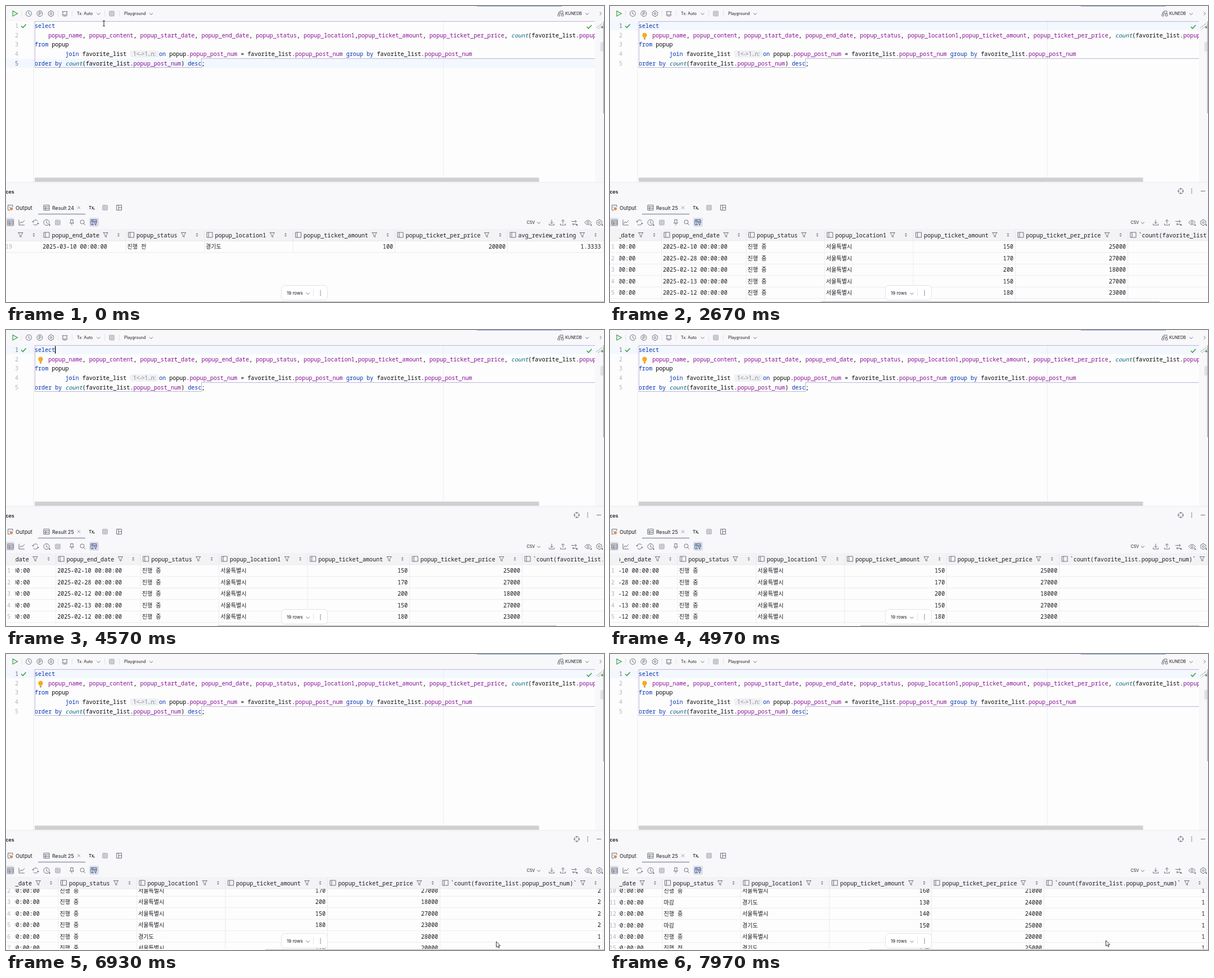
An HTML page with a canvas that plays this animation: 1063 px wide and 527 px high, repeating every 8000 ms.

```html
<!DOCTYPE html>
<html lang="ko">
<head>
<meta charset="utf-8">
<title>Query console</title>
<style>
html, body { margin: 0; width: 100%; height: 100%; overflow: hidden; background: #fdfdfd; }
canvas { display: block; }
</style>
</head>
<body>
<canvas id="stage" width="1063" height="527"></canvas>
<script>
const g = document.getElementById('stage').getContext('2d');
const LOOP = 8000, CLICK = 300, RUN = 1150, LOADED = 1250, DONE = 1650, BULB = 2000, HOVER = 1900;
const CW = 6.05, LINE_H = 16.7, ROW_H = 20.45;
const MONO = '"Noto Sans Mono", "Noto Sans CJK KR", monospace';
const UI = 'Inter, sans-serif';
const INK = '#1b1c20', ICON = '#6c707e', PALE = '#b4b7c0', RULE = '#ebecf0', PANEL = '#f8f8fb', GREEN = '#3d9f4d', RED = '#db3b4b';

const KEYWORDS = new Set(['select', 'from', 'join', 'on', 'group', 'by', 'order', 'desc']);
const CODE = [
  'select',
  '    popup_name, popup_content, popup_start_date, popup_end_date, popup_status, popup_location1,popup_ticket_amount, popup_ticket_per_price, count(favorite_list.popup_post_num)',
  'from popup',
  '         join favorite_list',
  'order by count(favorite_list.popup_post_num) desc;'
];
const JOIN_TAIL = 'on popup.popup_post_num = favorite_list.popup_post_num group by favorite_list.popup_post_num';

const NAMES = ['start_date', 'end_date', 'status', 'location1', 'ticket_amount', 'ticket_per_price'].map(n => 'popup_' + n);
const WIDTHS = [163.5, 150.5, 139.5, 157.5, 181.5, 200];
// day, status, city, amount, price in thousands
const ROWS = `02-10 중 S 150 25|02-28 중 S 170 27|02-12 중 S 200 18|02-13 중 S 150 27|02-12 중 S 180 23
|02-20 중 G 110 28|02-18 중 S 120 20|02-05 - G 160 21|02-22 중 S 90 27|02-25 중 S 160 21|02-03 - G 130 24
|02-21 중 S 140 24|02-04 - G 150 25|02-26 중 S 120 20|03-05 전 G 130 25|03-08 전 S 140 22|02-24 중 S 100 23
|03-06 전 G 120 21|03-10 전 G 100 20`.split('|').map((line, i) => {
  const [day, state, city, amount, price] = line.trim().split(' ');
  return ['2025-01-20 00:00:00', `2025-${day} 00:00:00`, state === '-' ? '마감' : '진행 ' + state,
    city === 'S' ? '서울특별시' : '경기도', amount, price + '000', i === 0 ? '3' : i < 5 ? '2' : '1'];
});

const SHAPES = {
  run: 'M-4-4.6L4.5 0-4 4.6z',
  clock: 'M5 0A5 5 0 1 1-5 0A5 5 0 1 1 5 0M0-3V0.5L2.5 2',
  param: 'M5 0A5 5 0 1 1-5 0A5 5 0 1 1 5 0M-1.3 3V-2.6H.5A1.6 1.6 0 0 1 .5 .8H-1.3',
  gear: 'M-1.3-5H1.3L2-3.6 3.7-3.4 5-1.2 4.2 0 5 1.2 3.7 3.4 2 3.6 1.3 5H-1.3L-2 3.6-3.7 3.4-5 1.2-4.2 0-5-1.2-3.7-3.4-2-3.6zM1.7 0A1.7 1.7 0 1 1-1.7 0A1.7 1.7 0 1 1 1.7 0',
  session: 'M-3.5-3.5H3.5V2.5H-3.5zM-5-3.5H-3.5M3.5-3.5H5M-5 2.5H-3.5M3.5 2.5H5M-3 4.5H3',
  down: 'M-3-1.4L0 1.5 3-1.4',
  right: 'M-1.5-3L1.5 0-1.5 3',
  scheme: 'M-1-4.5H4V-.5H-1zM-5 .8H-1.5V4.3H-5zM1.5 .8H5V4.3H1.5zM-1-2.5H-3.5V.8',
  check: 'M-4 0L-1 3 4.5-3',
  target: 'M4.5 0A4.5 4.5 0 1 1-4.5 0A4.5 4.5 0 1 1 4.5 0M0-5.5V-2M0 5.5V2M-5.5 0H-2M5.5 0H2',
  minus: 'M-4 0H4',
  console: 'M4-1V-4.5H-4.5V4.5H-1M-2.5-2L-.5 0',
  grid: 'M-5-4.5H5V4.5H-5zM-5-1.5H5M-5 1.5H5M-1.5-1.5V4.5',
  close: 'M-2.5-2.5L2.5 2.5M2.5-2.5L-2.5 2.5',
  layout: 'M-4.5-4.5H4.5V4.5H-4.5zM-1-4.5V4.5M-1 0H4.5',
  chart: 'M-5-5V4.5H5M-3.5 2L-1-1.5 1 .5 5-4',
  refresh: 'M-4.7-1A4.8 4.8 0 0 1 4-2.5M4.7 1A4.8 4.8 0 0 1-4 2.5M-6-2.5L-4.7-.5-2.7-1.7M6 2.5L4.7 .5 2.7 1.7',
  pin: 'M-2.5-5H2.5M-2-5V-1L-3.5 1H3.5L2-1V-5M0 1V5',
  search: 'M2.5-1A3.5 3.5 0 1 1-4.5-1A3.5 3.5 0 1 1 2.5-1M1.5 1.7L4.5 4.7',
  filterGrid: 'M0 4.5H-5V-4.5H5V-1M-5-1.8H5M-1.8-4.5V4.5M0 0H6L3.8 2.5V5L2.4 4.3V2.5z',
  download: 'M0-5V2M-2.8-.8L0 2 2.8-.8M-4.5 2V4.5H4.5V2',
  upload: 'M0 2V-5M-2.8-2.2L0-5 2.8-2.2M-4.5 2V4.5H4.5V2',
  compare: 'M-5-2H4M1.5-4.5L4-2 1.5 .5M5 3H-3M-.7 .8L-3 3-.7 5.2',
  eye: 'M-6 0Q0-8 6 0Q0 8-6 0zM1.8 0A1.8 1.8 0 1 1-1.8 0A1.8 1.8 0 1 1 1.8 0',
  column: 'M-5-4.5H5V4.5H-5zM-2-4.5V4.5',
  funnel: 'M-4.2-4H4.2L1.2 0V4L-1.2 2.8V0z',
  beam: 'M-2-5Q0-5 0-3.5Q0-5 2-5M0-3.5V3.5M-2 5Q0 5 0 3.5Q0 5 2 5'
};
const PATHS = Object.fromEntries(Object.entries(SHAPES).map(([k, d]) => [k, new Path2D(d)]));
const SORT = new Path2D('M-2-1L0-3.2 2-1zM-2 1L0 3.2 2 1z');
const ARROW = new Path2D('M0 0V10L2.4 8 4 11.4 5.6 10.6 4 7.3H7z');

function icon(name, x, y, color = ICON, width = 1) {
  g.save();
  g.translate(x, y);
  g.strokeStyle = color;
  g.lineWidth = width;
  g.stroke(PATHS[name]);
  g.restore();
}

function rect(x, y, w, h, color) {
  g.fillStyle = color;
  g.fillRect(x, y, w, h);
}

function pill(x, y, w, h, r, fill, border) {
  g.beginPath();
  g.roundRect(x, y, w, h, r);
  g.fillStyle = fill;
  g.fill();
  if (border) { g.strokeStyle = border; g.lineWidth = 1; g.stroke(); }
}

function dot(x, y, r, color) {
  g.beginPath();
  g.arc(x, y, r, 0, 7);
  g.fillStyle = color;
  g.fill();
}

function text(s, x, y, font, color = INK, align = 'left') {
  g.font = font;
  g.fillStyle = color;
  g.textAlign = align;
  g.fillText(s, x, y);
}

const mono = (s, x, y, color, align) => text(s, x, y, '10.08px ' + MONO, color, align);
const ui = (s, x, y, size, color, weight = 400) => text(s, x, y, `${weight} ${size}px ${UI}`, color);
const more = (x, y) => [-3.5, 0, 3.5].forEach(d => dot(x, y + d, 0.9, ICON));

function clip(x, y, w, h, draw) {
  g.save();
  g.beginPath();
  g.rect(x, y, w, h);
  g.clip();
  draw();
  g.restore();
}

function stop(x, y, running) {
  pill(x - 4.5, y - 4.5, 9, 9, 1.5, running ? '#fff5f5' : '#c9cbd1', running ? RED : '#b9bbc3');
}

function codeLine(s, x, y) {
  for (const { 0: word, index } of s.matchAll(/\w+|[^\w\s]+/g)) {
    const call = word === 'count';
    const color = call ? '#00627a' : KEYWORDS.has(word) ? '#0033b3' : word.startsWith('popup_') ? '#871094' : '#080808';
    text(word, x + index * CW, y, (call ? 'italic ' : '') + '10.08px ' + MONO, color);
  }
}

function toolbar(running) {
  rect(0, 0, 1063, 27, PANEL);
  rect(837, 0, 151, 0.7, '#5f7fc4');
  icon('run', 16, 13.5, GREEN, 1.2);
  icon('clock', 40.5, 13.5);
  icon('param', 60, 13.5);
  icon('gear', 80, 13.5);
  icon('session', 104.5, 13.5);
  [27, 92, 117, 175, 201].forEach(x => rect(x, 8, 1, 11, '#e3e4e9'));
  const tx = running ? PALE : INK;
  ui('Tx: Auto', 126, 16.3, 7.2, tx);
  icon('down', 164.5, 14, running ? PALE : ICON);
  stop(188, 13.5, running);
  ui('Playground', 210, 16.3, 7.2);
  icon('down', 258, 14);
  icon('scheme', 986, 13.5);
  ui('KUNEDB', 994, 16.3, 7.2);
  icon('down', 1033, 14);
  icon('right', 1057, 13.5);
}

function editor(t, running) {
  const current = t < CLICK ? 4 : 0;
  rect(0, 27, 1063, 287, '#fdfdfd');
  rect(0, 27 + current * LINE_H, 1047, LINE_H - 0.5, '#f3f7fe');
  rect(48.5, 27, 1, 287, RULE);
  rect(777, 27, 1, 278, RULE);
  CODE.forEach((s, i) => {
    const y = 39 + i * LINE_H;
    mono(i + 1, 22, y, i === current ? ICON : '#aeb3c2', 'right');
    clip(49, 27, 998, 278, () => codeLine(s, 51, y));
  });
  pill(220.5, 79, 51, 13, 4, '#f0f1f3');
  text('1<->1..n:', 226, 89, '10px "Noto Sans", sans-serif', '#868a91');
  codeLine(JOIN_TAIL, 272, 39 + 3 * LINE_H);

  g.strokeStyle = '#bdb4d6';
  g.lineWidth = 1;
  g.stroke(new Path2D('M1047 27.5H51.5V109.5H347.5V93.5H1047'));
  if ((t + 850) % 1000 < 500) {
    rect(51 + CODE[current].length * CW - 0.3, 28.5 + current * LINE_H, 1.3, 13.5, '#000');
  }
  if (!running) icon('check', 31, 35.5, GREEN, 1.6);
  if (t > BULB) {
    dot(61.5, 52, 4.2, '#f5ab1c');
    rect(59.8, 55.5, 3.4, 2, '#f5ab1c');
    rect(60, 58, 3, 1.2, ICON);
  }

  rect(51, 305.5, 896.5, 7.5, '#d0d0d1');
  rect(1047, 27, 16, 287, PANEL);
  icon('check', 1036.5, 37, GREEN, 1.6);
  g.strokeStyle = '#a5adab';
  g.stroke(new Path2D('M1049 39L1060 31M1052 41L1063 33'));
  dot(1060, 38, 1.8, GREEN);
  pill(1056.5, 64, 8, 17, 2, '#e0e1e5');
  rect(1061.7, 27, 1.3, 164, '#a9a9b0');
}

function resultBars(t, running) {
  rect(0, 314, 1063, 213, PANEL);
  rect(0, 313.5, 1063, 1, RULE);
  ui('ces', -0.5, 333.8, 8.8, INK, 600);
  if (t > HOVER) {
    icon('target', 1014.5, 329.5);
    more(1034, 329.5);
    icon('minus', 1054, 329.5);
  }

  icon('console', 8, 359);
  dot(9.5, 361, 2.6, '#e08a4a');
  ui('Output', 17, 362.5, 9.3);
  icon('grid', 72, 359);
  ui(t < LOADED ? 'Result 24' : 'Result 25', 82, 362.5, 8.8);
  const shift = running ? -12 : 0;
  if (!running) icon('close', 129.5, 359, '#8f939e');
  rect(57, 369.5, 84 + shift, 2, '#a8adbd');
  ui('Tx', 147 + shift, 362.3, 8, running ? PALE : INK, 500);
  dot(156.5 + shift, 361.5, 0.9, running ? PALE : INK);
  stop(176 + shift, 359, running);
  icon('layout', 201 + shift, 359);

  pill(-4, 377, 19, 16, 3, '#dfe1e8');
  pill(148, 377, 17, 16, 3, '#d9deea');
  icon('filterGrid', 156, 385, '#4c5f8c');
  const tools = { grid: 8, chart: 28, refresh: 52.5, clock: 72, pin: 117, search: 136.5, download: 970, upload: 990, compare: 1010, eye: 1034.5, gear: 1054.5 };
  for (const name in tools) icon(name, tools[name], 385.5);
  [77.5, 1015, 1040, 1060].forEach(x => dot(x, 390, 1, INK));
  stop(92, 385.5, running);
  ui('CSV', 925.5, 388.3, 7.2);
  icon('down', 947, 386);
}

function table(t) {
  const old = t < LOADED;
  const names = [...NAMES, old ? 'avg_review_rating' : '`count(favorite_list.popup_post_num)`'];
  const widths = [...WIDTHS, old ? 169.5 : 289.5];
  const left = old ? -101 : -72 - sideScroll(t);
  const top = old ? 18 * ROW_H : wheelScroll(t);

  rect(0, 397, 1063, 21, '#f3f3f6');
  rect(0, 418, 1063, 109, '#fdfdfd');
  rect(0, 417.5, 1063, 1, RULE);
  clip(0, 418, 1063, 107, () => {
    ROWS.forEach((row, i) => {
      const y = 418 + i * ROW_H - top;
      if (y < 390 || y > 527) return;
      mono(i + 1, 5, y + 14.3, '#aeb3c2', 'center');
      rect(0, y + ROW_H, 1061, 1, RULE);
      clip(16.5, 418, 1047, 107, () => {
        let x = left;
        row.forEach((cell, c) => {
          const end = x + widths[c];
          const value = old && c === 6 ? '1.3333' : cell;
          if (c < 4) mono(value, x + 2.5, y + 14.3);
          else mono(value, end - 3.5, y + 14.3, INK, 'right');
          rect(end - 0.5, y, 1, ROW_H, RULE);
          x = end;
        });
      });
    });
  });
  clip(16.5, 397, 1044, 21, () => {
    let x = left;
    names.forEach((name, c) => {
      const end = x + widths[c], tail = x + 19 + name.length * CW;
      icon('column', x + 9.5, 407.5);
      mono(name, x + 19, 411.6);
      icon('funnel', tail + 11, 407.5);
      g.save();
      g.translate(end - 13, 407.5);
      g.fillStyle = ICON;
      g.fill(SORT);
      g.restore();
      rect(end - 0.5, 399, 1, 18, '#e6e7eb');
      x = end;
    });
  });

  rect(old ? 416 : 375 + sideScroll(t) * 0.577, 525.7, old ? 647 : 602, 1.3, '#c3c3d0');
  pill(489.5, 497.5, 82, 26, 6, '#fff', '#e1e3e8');
  ui('19 rows', 499, 514.3, 8);
  icon('down', 536.5, 512);
  rect(546, 504, 1, 13, '#e1e3e8');
  more(559, 511);
}

function spinner(t) {
  g.save();
  g.translate(531, 452.5);
  g.lineWidth = 2.8;
  const step = Math.floor(t / 100);
  for (let i = 0; i < 8; i++) {
    g.rotate(Math.PI / 4);
    g.strokeStyle = `rgba(110,114,125,${0.3 + 0.45 * ((i - step % 8 + 8) % 8) / 8})`;
    g.beginPath();
    g.moveTo(0, -5.5);
    g.lineTo(0, -10.5);
    g.stroke();
  }
  g.restore();
}

const clamp = u => Math.min(1, Math.max(0, u));
const smooth = u => u * u * (3 - 2 * u);
const sideScroll = t => 149 * smooth(clamp((t - 4520) / 620));
// Each wheel notch glides three rows.
const wheelScroll = t => [6885, 7150, 7520, 7961].reduce(
  (sum, start) => sum + 3 * ROW_H * (1 - (1 - clamp((t - start) / 250)) ** 3), 0);

const MOUSE = [[0, 174, 31], [CLICK, 174, 32], [1050, 168, 42], [1400, 125, 93], [1700, 190, 230], [2150, 480, 545],
  [6350, 866, 545], [6700, 873, 513], [6930, 871.5, 512], [7430, 878.5, 510], [7970, 881.5, 510], [LOOP, 881.5, 510]];

function pointer(t) {
  const i = MOUSE.findIndex(k => k[0] > t);
  const [t0, x0, y0] = MOUSE[i - 1], [t1, x1, y1] = MOUSE[i];
  const u = smooth((t - t0) / (t1 - t0));
  const x = x0 + (x1 - x0) * u, y = y0 + (y1 - y0) * u;
  if (y < 305) return icon('beam', x, y, '#222');
  g.save();
  g.translate(x, y);
  g.fillStyle = '#fff';
  g.fill(ARROW);
  g.strokeStyle = '#222';
  g.lineWidth = 0.9;
  g.stroke(ARROW);
  g.restore();
}

function frame() {
  const t = performance.now() % LOOP;
  const running = t >= RUN && t < DONE;
  toolbar(running);
  editor(t, running);
  resultBars(t, running);
  table(t);
  if (running) spinner(t);
  pointer(t);
  requestAnimationFrame(frame);
}
requestAnimationFrame(frame);
</script>
</body>
</html>
```
